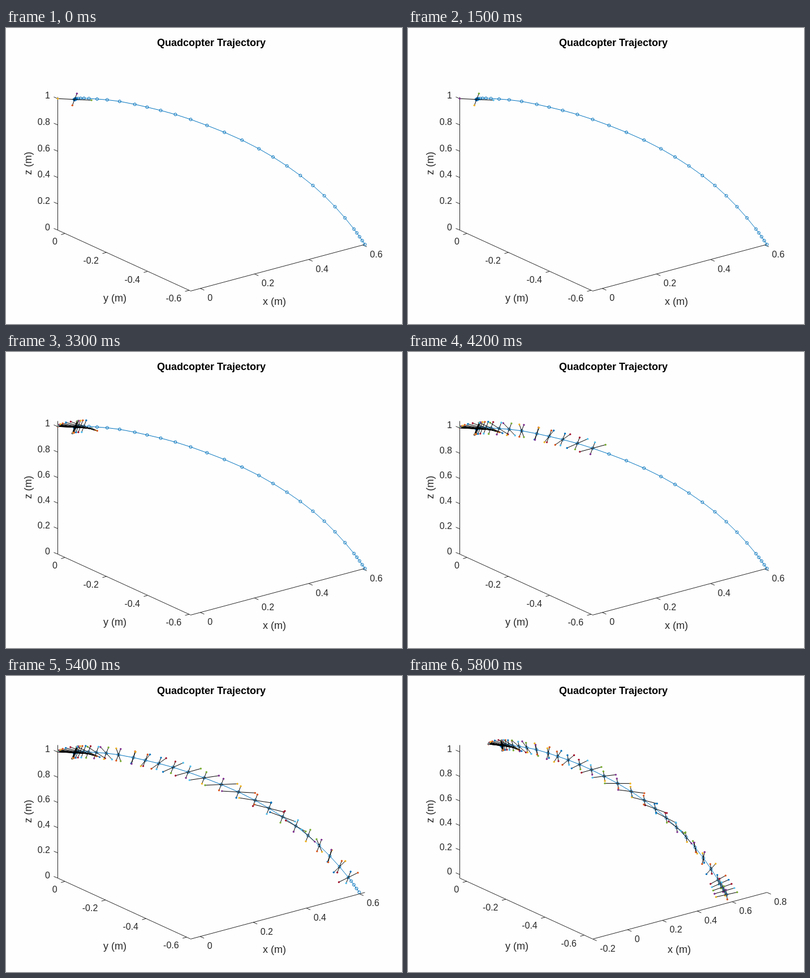
Animation of 700 by 525 pixels, one loop 5900 ms. Source, as an HTML page:

```html
<!DOCTYPE html>
<html lang="en">
<head>
<meta charset="utf-8">
<title>Quadcopter Trajectory</title>
<style>
html, body { margin: 0; width: 100%; height: 100%; overflow: hidden; background: #fefefe; }
svg { display: block; width: 700px; height: 525px; font: 16px "Liberation Sans", Arial, sans-serif; }
</style>
</head>
<body>
<svg id="stage" viewBox="0 0 700 525"></svg>
<script>
const COLORS = ['#0072bd', '#d95319', '#edb120', '#7e2f8e', '#77ac30', '#4dbeee', '#a2142f'];
const INK = '#262626', STEP = 100, COUNT = 59, ARM = 0.05, SIDE = ARM * Math.SQRT1_2;

// Flight keys, four poses apart: time since the previous key, x = -y (m), z (m), pitch (degrees)
const KEYS = [
  [0, 0, 1, 0], [1, 0.001, 1.001, 5], [1, 0.004, 1.006, 16], [1.2, 0.03, 1.012, 47],
  [1.45, 0.126, 0.984, 96], [1, 0.243, 0.889, 139.5], [1, 0.386, 0.69, 196],
  [0.86, 0.499, 0.43, 246.5], [0.84, 0.585, 0.113, 305], [0.29, 0.608, 0, 324]
];
const HOVER = COUNT - 1 - 4 * (KEYS.length - 1);

const slope = (k, c) => (KEYS[k][c] - KEYS[k - 1][c]) / KEYS[k][0];
function tangent(k, c) {
  if (k === 0) return 0;
  if (k === KEYS.length - 1) return slope(k, c);
  const h0 = KEYS[k][0], h1 = KEYS[k + 1][0];
  return (slope(k, c) * h1 + slope(k + 1, c) * h0) / (h0 + h1);
}

// Cubic Hermite value of column c, u of the way from key k to the next
function blend(k, u, c) {
  const h = KEYS[k + 1][0], w = u * u * (3 - 2 * u), v = 1 - u;
  return KEYS[k][c] * (1 - w) + KEYS[k + 1][c] * w +
    h * u * v * (tangent(k, c) * v - tangent(k + 1, c) * u);
}

const poses = Array.from({ length: COUNT }, (_, i) => {
  const p = Math.max(0, i - HOVER) / 4;
  const k = Math.min(Math.floor(p), KEYS.length - 2);
  const [s, z, pitch] = [1, 2, 3].map(c => blend(k, p - k, c));
  return { s, z, pitch: pitch * Math.PI / 180 };
});

const n = v => v.toFixed(2);
const line = (a, b, color) =>
  `<path d="M${n(a[0])} ${n(a[1])}L${n(b[0])} ${n(b[1])}" stroke="${color}"/>`;
const text = (x, y, str, extra = '', color = INK) =>
  `<text x="${n(x)}" y="${n(y)}" fill="${color}" ${extra}>${str}</text>`;
const MID = 'text-anchor="middle" font-size="18"', END = 'text-anchor="end"';

function limits(frame) {
  const shown = poses.slice(0, frame + 1);
  const reach = Math.max(0.608, ...shown.map(p => p.s + SIDE));
  const lift = p => ARM * Math.abs(Math.sin(p.pitch));
  return {
    x: [frame > 54 ? -0.2 : -SIDE, frame > 56 ? 0.8 : reach],
    y: [-reach, SIDE],
    z: [Math.min(0, ...shown.map(p => p.z - lift(p))),
        Math.max(1.012, ...shown.map(p => p.z + lift(p)))]
  };
}

function draw(frame) {
  const lim = limits(frame);
  const frac = (axis, v) => (v - lim[axis][0]) / (lim[axis][1] - lim[axis][0]);
  const project = (x, y, z) => {
    const u = frac('x', x), v = 1 - frac('y', y);
    return [91.5 + 308 * u + 235 * v, 358.5 - 82.6 * u + 108 * v - 236 * frac('z', z)];
  };
  const ticks = (axis, place) => {
    for (let i = -3; i <= 5; i++) {
      const v = i / 5;
      if (v >= lim[axis][0] - 1e-6 && v <= lim[axis][1] + 1e-6) place(v, String(v));
    }
  };
  const [x0, x1] = lim.x, [y0, y1] = lim.y, [z0, z1] = lim.z;
  const left = project(x0, y1, z0), front = project(x0, y0, z0);
  let out = line(left, project(x0, y1, z1), INK) + line(left, front, INK) +
    line(front, project(x1, y0, z0), INK);

  ticks('x', (v, str) => {
    const [x, y] = project(v, y0, z0);
    out += line([x, y], [x + 7, y + 3], INK) + text(x + 12.7, y + 22, str);
  });
  ticks('y', (v, str) => {
    const [x, y] = project(x0, v, z0);
    out += line([x, y], [x - 7, y + 2], INK) + text(x - 13.5, y + 20, str, END);
  });
  ticks('z', (v, str) => {
    const [x, y] = project(x0, y1, v);
    out += line([x, y], [x - 7, y - 3], INK) + text(78, y, str, END);
  });
  out += text(363, 32, 'Quadcopter Trajectory', MID + ' font-weight="bold"', '#000') +
    text(x0 < -0.1 ? 479.5 : 474.5, 491, 'x (m)', MID) + text(192.5, 485, 'y (m)', MID) +
    text(0, 0, 'z (m)', MID + ' transform="translate(45 240) rotate(-90)"');

  const path = poses.map(p => project(p.s, -p.s, p.z));
  out += `<g stroke="${COLORS[0]}"><polyline points="${path.map(p => p.map(n)).join(' ')}"/>` +
    path.map(([x, y]) => `<circle cx="${n(x)}" cy="${n(y)}" r="2.5"/>`).join('') + '</g>';

  // Hovering poses coincide, so only the newest of them is drawn
  for (let i = Math.min(frame, HOVER); i <= frame; i++) {
    const { s, z, pitch } = poses[i];
    const c = -SIDE * Math.cos(pitch), h = ARM * Math.sin(pitch);
    const tips = [[-SIDE, -SIDE, 0], [c, -c, h], [SIDE, SIDE, 0], [-c, c, -h]]
      .map(([a, b, d]) => project(s + a, -s + b, z + d));
    const color = 1 + 6 * (i - (i > 1) - (i > 9)); // two beats repeat their colours
    out += line(tips[0], tips[2], '#000') + line(tips[1], tips[3], '#000');
    tips.forEach(([x, y], j) => {
      out += `<circle cx="${n(x)}" cy="${n(y)}" r="1.7" fill="${COLORS[(color + j) % 7]}"/>`;
    });
  }
  document.getElementById('stage').innerHTML = `<g fill="none">${out}</g>`;
}

let last = -1;
function tick() {
  const frame = Math.floor(performance.now() / STEP) % COUNT;
  if (frame !== last) draw(last = frame);
  requestAnimationFrame(tick);
}
tick();
</script>
</body>
</html>
```
